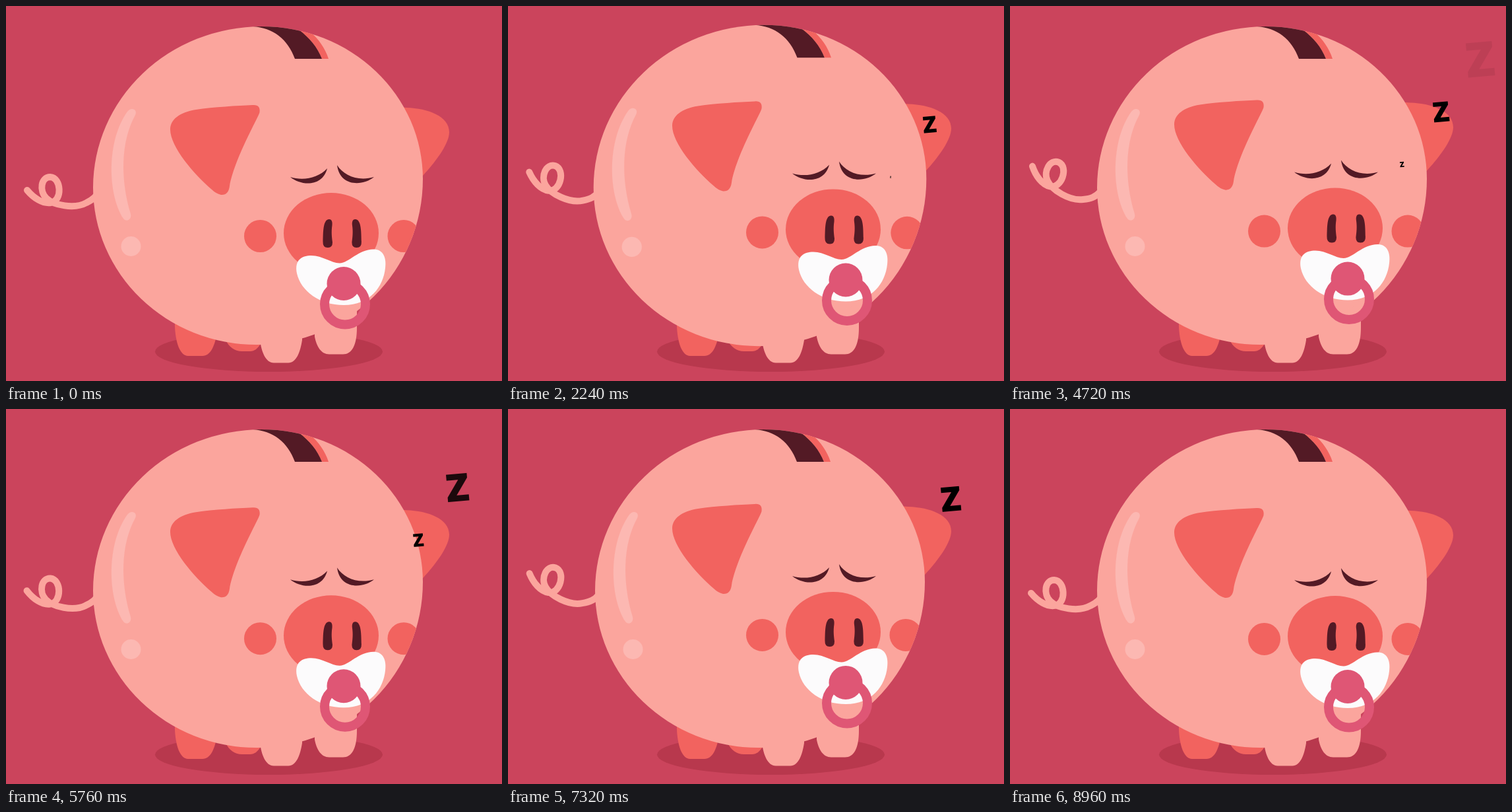
Write an HTML page with a canvas that moves like this. It is 752 by 568 pixels and loops after 9 s.

```html
<!DOCTYPE html>
<html lang="en">
<head>
<meta charset="utf-8">
<title>Sleeping piggy bank</title>
<style>
html, body { margin: 0; width: 752px; height: 568px; overflow: hidden; background: #cb445c; }
canvas { display: block; }
</style>
</head>
<body>
<canvas id="stage" width="752" height="568"></canvas>
<script>
const ctx = document.getElementById('stage').getContext('2d');
const LOOP = 9000, STEP = 40, BREATH = 3000, RISE = 1850;
const PINK = '#fba59d', CORAL = '#f2635f', DARK = '#531a25', ROSE = '#df5675';

const shape = d => new Path2D(d);

const body = new Path2D();
body.ellipse(388, 262, 244, 231, 0, -Math.PI / 2, 0);
body.ellipse(380, 262, 252, 251, 0, 0, Math.PI / 2);
body.ellipse(380, 275, 248, 238, 0, Math.PI / 2, Math.PI);
body.ellipse(388, 275, 256, 244, 0, Math.PI, Math.PI * 1.5);
body.closePath();

const tail = shape('M32 279C42 291 56 300 68 298C86 295 84 260 67 259C53 259 50 280 61 291C72 302 104 308 122 298C132 293 138 288 142 278');
const backLegs = shape('M256 460V485C257 510 264 530 276 530H298C310 530 316 515 319 500V460ZM333 480V506C338 516 346 523 358 523H370C377 523 381 519 386 512V480Z');
const frontLegs = shape('M385 490V505C387 524 394 540.5 406 540.5H428C440 540.5 446 525 449 506V490ZM468 480V501C471 516 478 527.5 490 527.5H511C524 527.5 532 515 532 487V450Z');
const farEar = shape('M580 152L607 154C640 155 672 167 672 191C672 207 655 232 632 257L616 272L580 220Z');
const nearEar = shape('M374 150Q386 149 384.5 161C383 168 346 232 339 273Q337 287 326 286Q318 284 312 278C285 255 249 213 249 187C249 172 263 161 288 157C315 153 350 151 374 150Z');
const slot = shape('M374 31L374 20H444V36C460 48 472 62 479 80H438C427 50 405 33 374 31Z');
const slotEdge = shape('M444 36V20L461 39C474 50 484 64 489 80H479C472 62 460 48 444 36Z');
const shine = shape('M184 160C190 152 200 157 196 165C174 205 173 262 189 315C191 323 183 328 178 322C154 285 152 205 184 160Z');
const eyes = shape('M431 259C450 265 473 261 487 246C480 274 448 273 431 259ZM502 241C512 257 534 266 558 259C541 273 506 274 502 241Z');
const nostril = shape('M490 323C494 323 495 327 494.5 332C493 342 494 350 495 358Q495 366 488 366Q480 366 480.5 357C481 345 480 323 490 323Z');
const shield = shape('M441 405C437 384 449 378 463 378C480 378 494 390 506 389.5C520 389 535 368 558 368.5C573 369 577 383 575 397C572 425 552 453 512 453C476 453 447 432 441 405Z');

function fill(path, color) {
  ctx.fillStyle = color;
  ctx.fill(path);
}

function oval(x, y, rx, ry, color) {
  ctx.beginPath();
  ctx.ellipse(x, y, rx, ry, 0, 0, Math.PI * 2);
  ctx.fillStyle = color;
  ctx.fill();
}

function group(draw) {
  ctx.save();
  draw();
  ctx.restore();
}

// 0 at rest, 1 at the top of a breath
function breath(t) {
  const p = t % BREATH;
  const k = p < RISE ? p / RISE : (BREATH - p) / (BREATH - RISE);
  return (1 - Math.cos(Math.PI * k)) / 2;
}

function swell(amount) {
  ctx.translate(382, 272);
  ctx.scale(amount, amount);
  ctx.translate(-382, -272);
}

function drawTail(b) {
  ctx.translate(130, 266);
  ctx.rotate(b * 21.5 * Math.PI / 180);
  ctx.translate(-130, -266);
  ctx.strokeStyle = PINK;
  ctx.lineWidth = 10;
  ctx.lineCap = 'round';
  ctx.lineJoin = 'round';
  ctx.stroke(tail);
}

function drawBody() {
  fill(body, PINK);
  ctx.clip(body);
  fill(slotEdge, CORAL);
  fill(slot, DARK);
  fill(shine, '#fcb8b2');
  oval(189.5, 364, 15, 15, '#fcb8b2');
}

function drawFace() {
  fill(nearEar, CORAL);
  fill(eyes, DARK);
  oval(385.5, 348.5, 24.5, 24.5, CORAL);
  oval(493, 344, 72, 61, CORAL);
  fill(nostril, DARK);
  group(() => {
    ctx.translate(1019.4, 0);
    ctx.scale(-1, 1);
    fill(nostril, DARK);
  });
  fill(shield, '#fcfbfc');
  ctx.beginPath();
  ctx.arc(514, 451.5, 31, 0, Math.PI * 2);
  ctx.strokeStyle = ROSE;
  ctx.lineWidth = 14;
  ctx.stroke();
  oval(512, 420.5, 25.5, 25.5, ROSE);
}

function drawZ(age) {
  if (age <= 0 || age >= 4800) return;
  ctx.globalAlpha = Math.min(1, (4800 - age) / 1200);
  ctx.translate(573 + age * 0.0296, 268.7 - age * 0.0398);
  ctx.rotate(-5 * Math.PI / 180);
  // glyph is set at 100px and scaled, so growth stays smooth
  ctx.font = '800 100px "Open Sans", "Noto Sans", sans-serif';
  const m = ctx.measureText('Z');
  const top = m.actualBoundingBoxAscent, low = m.actualBoundingBoxDescent;
  const left = m.actualBoundingBoxLeft, right = m.actualBoundingBoxRight;
  const s = age * 0.011 / (top + low);
  ctx.scale(s, s);
  ctx.fillStyle = '#000';
  ctx.fillText('Z', (left - right) / 2, (top - low) / 2);
}

function draw(t) {
  const b = breath(t);
  const lift = -7.5 * b;
  const size = t < BREATH ? 1 + 0.0125 * b : 1;

  ctx.fillStyle = '#cb445c';
  ctx.fillRect(0, 0, 752, 568);
  oval(398.5, 523.5, 172.5, 30.5, '#b8384d');
  fill(backLegs, CORAL);
  group(() => drawTail(b));
  group(() => {
    ctx.translate(0, lift);
    fill(farEar, CORAL);
  });
  group(() => {
    swell(size);
    drawBody();
    oval(603, 348.5 + lift, 24.5, 24.5, CORAL);
  });
  fill(frontLegs, PINK);
  group(() => {
    ctx.translate(0, lift);
    drawFace();
  });
  for (const start of [0, 2000, 4000]) group(() => drawZ(t - start));
}

const begin = performance.now();
function tick(now) {
  const t = Math.max(0, now - begin) % LOOP;
  draw(Math.floor(t / STEP) * STEP);
  requestAnimationFrame(tick);
}
draw(0);
requestAnimationFrame(tick);
</script>
</body>
</html>
```
